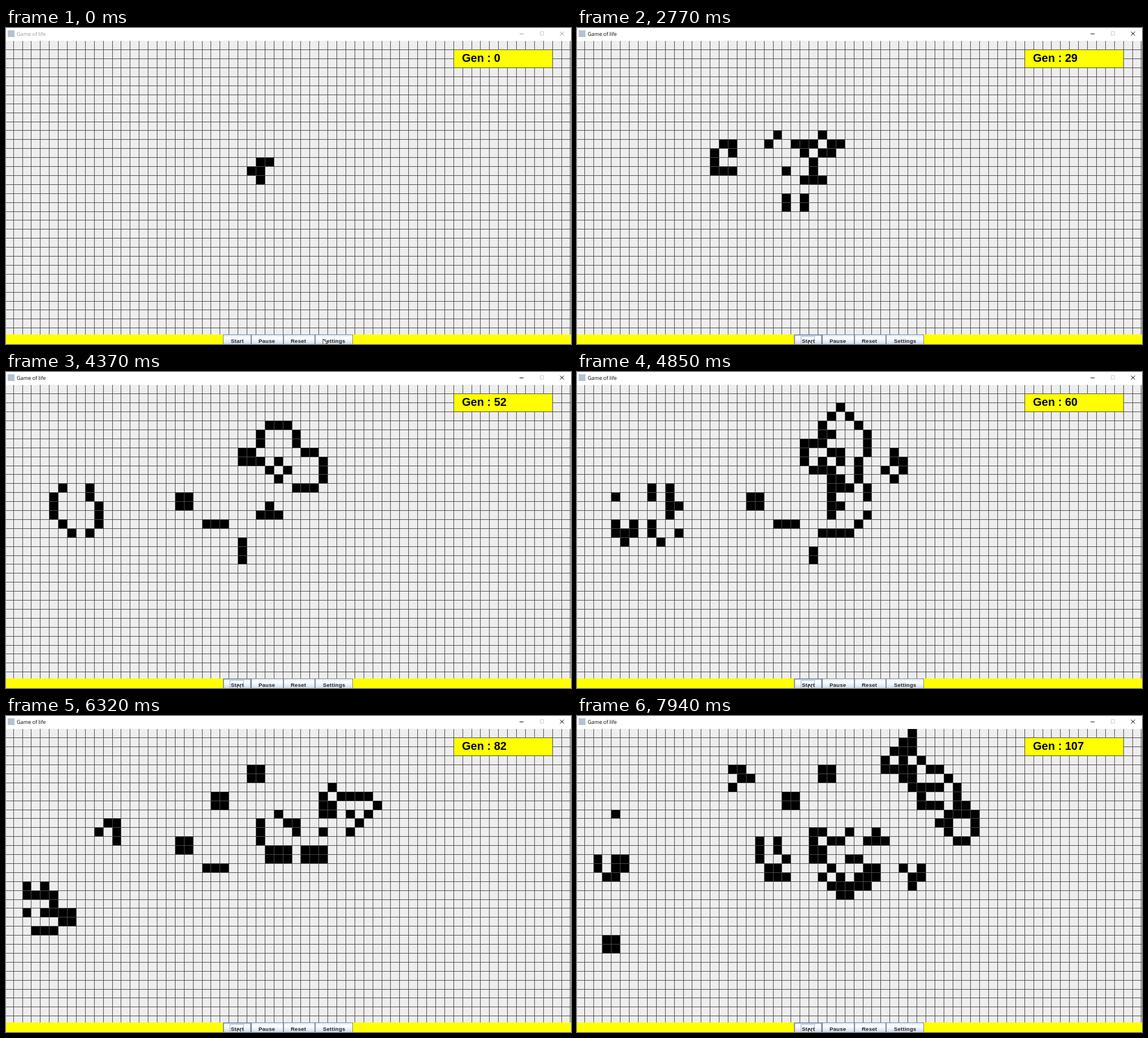
Animation, 1000 px wide and 560 px high, one loop 8 s. Source, as an HTML page with a canvas:

```html
<!DOCTYPE html>
<html lang="en">
<head>
<meta charset="utf-8">
<title>Game of life</title>
<style>
  html, body { margin: 0; width: 100%; height: 100%; overflow: hidden; }
  canvas { display: block; }
</style>
</head>
<body>
<canvas id="stage" width="1000" height="560"></canvas>
<script>
const ctx = document.getElementById('stage').getContext('2d');
const LOOP = 8000, COLS = 63, ROWS = 33, LAST_GEN = 109;
const LOST_TICK = 37; // the counter label misses one step here
const CELL = 15.9, LEFT = -2.8, TOP = 22.95;
const lineX = c => Math.floor(LEFT + c * CELL);
const lineY = r => Math.floor(TOP + r * CELL);

// Conway's rules on a bounded board
function nextGeneration(board) {
  const alive = (c, r) => c >= 0 && r >= 0 && c < COLS && r < ROWS && board[r * COLS + c];
  return board.map((live, i) => {
    const c = i % COLS, r = Math.floor(i / COLS);
    let n = 0;
    for (let dr = -1; dr <= 1; dr++)
      for (let dc = -1; dc <= 1; dc++)
        if ((dr || dc) && alive(c + dc, r + dr)) n++;
    return n === 3 || (live && n === 2) ? 1 : 0;
  });
}

const start = new Uint8Array(COLS * ROWS);
for (const [c, r] of [[28, 13], [29, 13], [27, 14], [28, 14], [28, 15]]) start[r * COLS + c] = 1;
const history = [start];
while (history.length <= LAST_GEN) history.push(nextGeneration(history[history.length - 1]));

function rect(color, x, y, w, h) {
  ctx.fillStyle = color;
  ctx.fillRect(x, y, w, h);
}

function frame(color, x, y, w, h) {
  ctx.strokeStyle = color;
  ctx.strokeRect(x + .5, y + .5, w - 1, h - 1);
}

function text(str, x, y, font, color, spacing = 0) {
  ctx.font = font;
  ctx.letterSpacing = spacing + 'px';
  ctx.fillStyle = color;
  ctx.fillText(str, x, y);
}

function drawTitleBar(active) {
  const ink = active ? '#000' : '#999';
  rect('#fff', 0, 0, 1000, 23);
  rect('#b4c3d0', 3, 4, 12, 12);
  text('Game of life', 19, 14, '9.1px "Open Sans", sans-serif', ink);
  rect(ink, 909, 10, 7, 1);
  frame('#ccc', 945, 6, 7, 7);
  ctx.strokeStyle = ink;
  ctx.beginPath();
  ctx.moveTo(980.5, 6.5); ctx.lineTo(987.5, 13.5);
  ctx.moveTo(987.5, 6.5); ctx.lineTo(980.5, 13.5);
  ctx.stroke();
}

function drawBoard(board) {
  rect('#eee', 0, 23, 1000, 520);
  board.forEach((live, i) => {
    if (!live) return;
    const c = i % COLS, r = Math.floor(i / COLS), x = lineX(c), y = lineY(r);
    rect('#000', x, y, lineX(c + 1) - x, lineY(r + 1) - y);
  });
  for (let c = 1; c <= COLS; c++) rect('#4a4a4a', lineX(c), 23, 1, 520);
  for (let r = 1; r < ROWS; r++) rect('#4a4a4a', 0, lineY(r), 1000, 1);
}

function drawCounter(gen) {
  rect('#ff0', 792, 39, 175, 31);
  frame('#4a4a4a', 792, 38, 176, 33);
  text('Gen : ' + gen, 807, 60, 'bold 20px "Liberation Sans", Arial, sans-serif', '#000');
}

function drawButton(label, x, w, textX, focused, hovered) {
  const shade = ctx.createLinearGradient(0, 543, 0, 565);
  shade.addColorStop(0, '#dde8f3');
  shade.addColorStop(.3, '#fff');
  shade.addColorStop(1, '#b8cfe5');
  rect(shade, x, 543, w, 22);
  frame('#7a8a99', x, 543, w, 22);
  if (hovered) frame('#8ea6c4', x + 1, 544, w - 2, 22);
  if (focused) frame('#a3b8cc', 396, 546, 25, 20);
  text(label, textX, 558, 'bold 9.5px "Liberation Sans", Arial, sans-serif', '#222', .25);
}

// Cursor tip: [time, x, y]
const pointerPath = [[70, 561, 551], [780, 408, 552], [920, 408, 552], [1450, 460, 470],
  [1800, 460, 470], [2560, 410, 554]];

function pointerAt(t) {
  const next = pointerPath.findIndex(p => p[0] > t);
  if (next === 0) return pointerPath[0].slice(1);
  if (next < 0) return pointerPath[pointerPath.length - 1].slice(1);
  const [t0, x0, y0] = pointerPath[next - 1], [t1, x1, y1] = pointerPath[next];
  const k = (t - t0) / (t1 - t0), e = k * k * (3 - 2 * k);
  return [x0 + (x1 - x0) * e, y0 + (y1 - y0) * e];
}

const arrow = new Path2D('M0 0V11.2L2.6 8.8L4.4 12.8L6.1 12L4.4 8.2H8Z');

function drawPointer([x, y]) {
  ctx.save();
  ctx.translate(x, y);
  ctx.fillStyle = '#fff';
  ctx.fill(arrow);
  ctx.strokeStyle = '#000';
  ctx.lineWidth = .8;
  ctx.stroke(arrow);
  ctx.restore();
}

function draw(now) {
  const t = now % LOOP;
  const shot = Math.max(0, 1660 + 69.6 * Math.floor((t - 1660) / 69.6 + .2));
  const gen = Math.min(LAST_GEN, Math.max(0, Math.floor((shot - 838) / 65.5)));
  const active = shot > 870;
  const pointer = pointerAt(shot);
  const hovered = active && pointer[0] < 434 && pointer[1] > 543;

  drawBoard(history[gen]);
  drawTitleBar(active);
  drawCounter(gen < LOST_TICK ? gen : gen - 1);
  rect('#ff0', 0, 543, 1000, 17);
  drawButton('Start', 384, 50, 398, active, hovered);
  drawButton('Pause', 434, 57, 447, false, false);
  drawButton('Reset', 491, 56, 504, false, false);
  drawButton('Settings', 547, 67, 561, false, false);
  drawPointer(pointer);
  requestAnimationFrame(draw);
}
requestAnimationFrame(draw);
</script>
</body>
</html>
```
